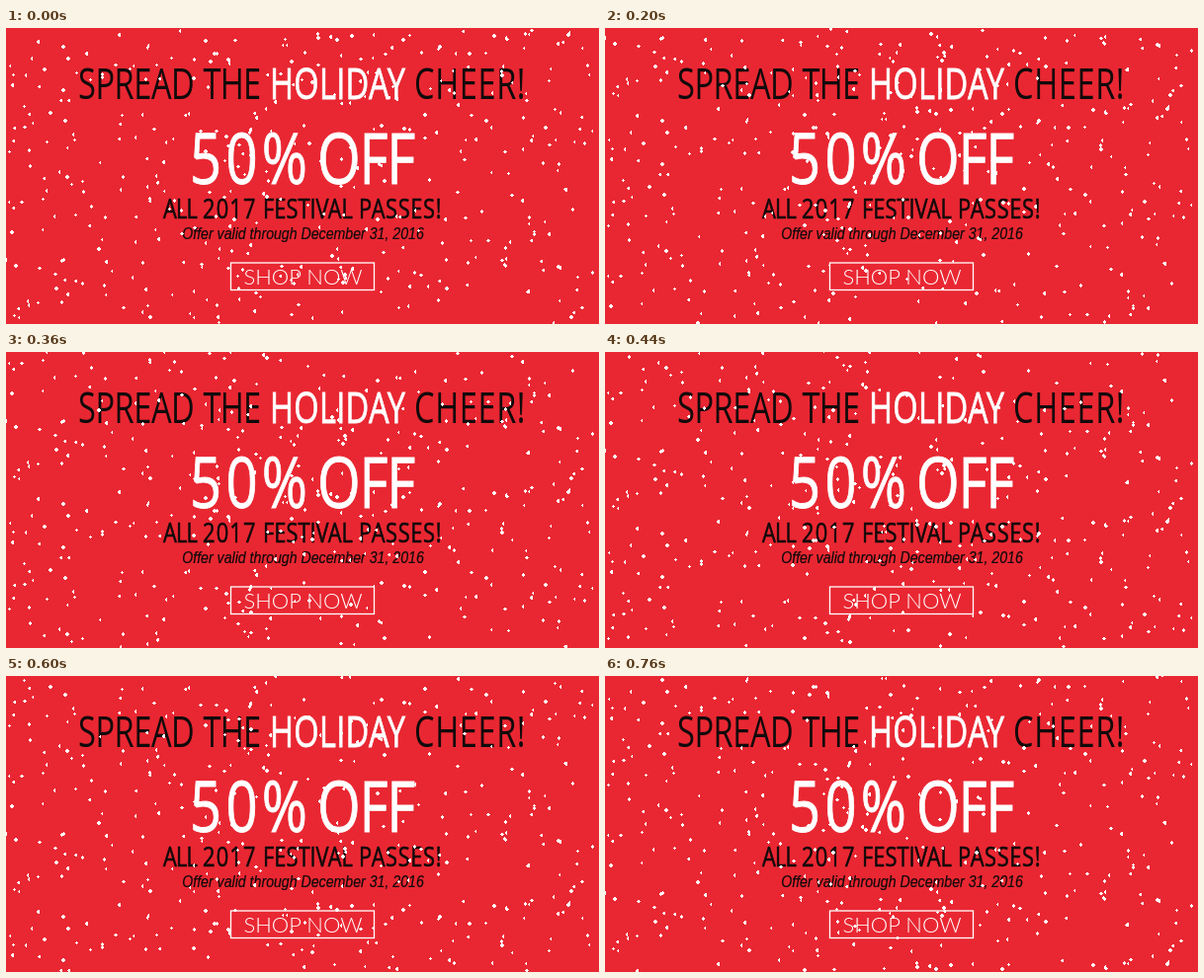
An HTML page that plays this animation: 600x300 px, repeating every 800 ms.

```html
<!DOCTYPE html>
<html lang="en">
<head>
<meta charset="utf-8">
<title>Holiday offer</title>
<style>
  html, body { margin: 0; width: 100%; height: 100%; overflow: hidden; background: #e92732; }
  svg { display: block; width: 600px; height: 300px; }
  text { font-family: "Open Sans", "Noto Sans", sans-serif; white-space: pre; }
  .fine { font-family: "Liberation Sans", Arial, sans-serif; font-style: italic; }
  .button { font-family: Lato, sans-serif; font-weight: 300; }
</style>
</head>
<body>
<svg viewBox="0 0 600 300" xmlns="http://www.w3.org/2000/svg">
  <rect width="600" height="300" fill="#e92732"/>
  <g id="copy"></g>
  <rect x="227.5" y="238" width="145" height="27.5" fill="none" stroke="#fff" stroke-width="1.3"/>
  <text class="button" x="300.5" y="260" font-size="22" fill="#fff" text-anchor="middle">SHOP NOW</text>
  <path id="snow" fill="#fff" shape-rendering="crispEdges"/>
</svg>
<script>
const NS = "http://www.w3.org/2000/svg";
const WIDTH = 600, HEIGHT = 300;
const LOOP = 800, STEP = 40, COUNT = 400;
const INK = "#100a0b", WHITE = "#fff";
const copy = document.getElementById("copy");
const snow = document.getElementById("snow");

function addText(label, x, y, style, fill, spacing = 0, cls = "") {
  const el = document.createElementNS(NS, "text");
  const attrs = {
    transform: `translate(${x} ${y}) scale(${style.condense} 1)`,
    "font-size": style.size,
    "letter-spacing": spacing,
    "text-anchor": style.anchor || "start",
    class: cls,
    fill,
    stroke: fill,
    "stroke-width": style.weight
  };
  for (const key in attrs) el.setAttribute(key, attrs[key]);
  el.textContent = label;
  copy.append(el);
}

const head = { size: 43.4, condense: 0.75, weight: 0 };
const headBold = { ...head, weight: 0.8 };
const big = { size: 72, condense: 0.78, weight: 0.9 };
const sub = { size: 28, condense: 0.78, weight: 0.6 };
const fine = { size: 16, condense: 0.885, weight: 0.2, anchor: "middle" };

addText("SPREAD", 73, 72, head, INK, -0.6);
addText("THE", 199.5, 72, head, INK, -1);
addText("HOLIDAY", 267, 72, headBold, WHITE, 0.4);
addText("CHEER!", 413, 72, head, INK, 0.8);
addText("50%", 186, 158, big, WHITE, 5.5);
addText("OFF", 315, 158, big, WHITE, -1.6);
addText("ALL", 159, 192.5, sub, INK, -1);
addText("2017", 199, 192.5, sub, INK, 1.5);
addText("FESTIVAL", 260, 192.5, sub, INK, 0);
addText("PASSES!", 357, 192.5, sub, INK, 0.8);
addText("Offer valid through December 31, 2016", 300.5, 214, fine, INK, 0, "fine");

// Seeded generator keeps the snowfall the same on every load.
let seed = 2017;
function random() {
  seed = (seed + 0x6d2b79f5) | 0;
  let t = Math.imul(seed ^ (seed >>> 15), seed | 1);
  t ^= t + Math.imul(t ^ (t >>> 7), t | 61);
  return ((t ^ (t >>> 14)) >>> 0) / 4294967296;
}
const pick = (min, max) => min + Math.floor(random() * (max - min + 1));

const box = (w, h) => `h${w}v${h}h${-w}z`;

// A flake is a small cross of two blocks, so its corners look rounded.
const flakes = Array.from({ length: COUNT }, () => {
  const x = pick(-2, WIDTH - 2), y = pick(0, HEIGHT - 1);
  const w = pick(1, 2), h = pick(1, 2);
  return { x, y, shape: box(w, h + 2) + "m-1 1" + box(w + pick(1, 2), h) };
});

function draw(time) {
  const step = Math.floor((time % LOOP) / STEP);
  const fall = step * HEIGHT * STEP / LOOP;
  snow.setAttribute("d", flakes.map(f =>
    `M${f.x} ${(f.y + fall) % HEIGHT - 2}` + f.shape).join(""));
}

function tick() {
  draw(performance.now());
  requestAnimationFrame(tick);
}
tick();
</script>
</body>
</html>
```
